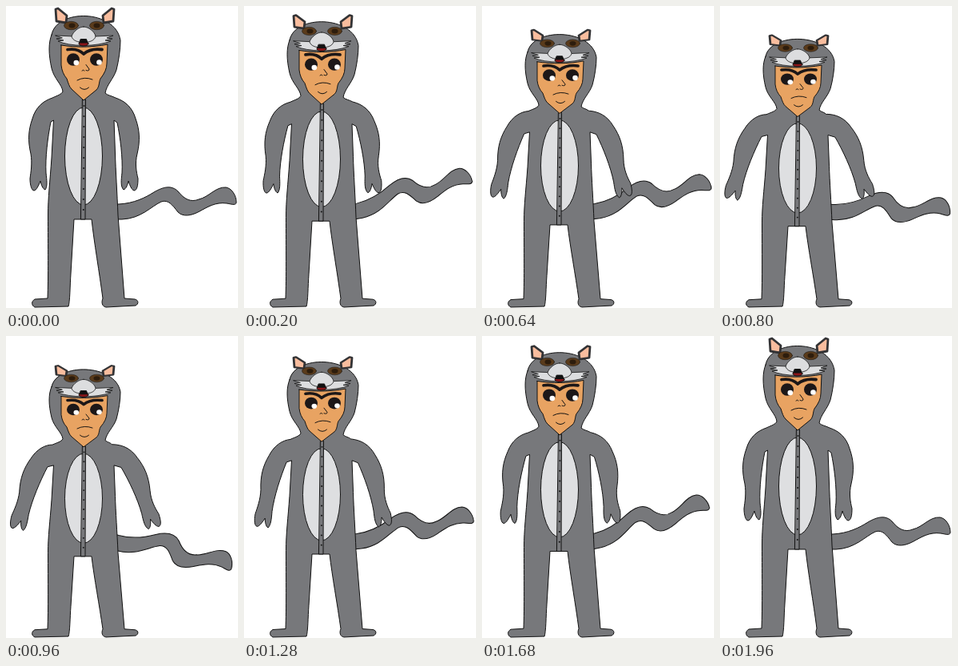
Animation of 290x378 px, one loop 2000 ms. Source, as an HTML page:

```html
<!DOCTYPE html>
<html lang="en">
<head>
<meta charset="utf-8">
<title>Rat costume</title>
<style>
  html, body { margin: 0; width: 100%; height: 100%; overflow: hidden; background: #fff; }
  svg { display: block; width: 100vw; height: 100vh; }
</style>
</head>
<body>
<svg viewBox="0 0 290 378" stroke="#111" stroke-width="1" stroke-linejoin="round" stroke-linecap="round">
  <path id="tail" fill="#77787b" d="M128,248 L141,248 C160,247 174,240 185,233 C197,226 207,224 215,232 C223,242 231,246 241,242 C254,239 262,226 275,227 C282,228 288,237 288,246 C287,250 282,248 276,247 C262,245 251,252 242,257 C231,263 221,264 215,258 C208,249 203,242 194,245 C181,251 169,266 145,267 L128,267"/>
  <path id="suit" fill="#77787b"/>
  <g id="front">
    <ellipse cx="97" cy="188" rx="23.5" ry="61" fill="#dedfe1"/>
    <path d="M95.8,117 L99.5,117 L99,267 L93.8,267Z" fill="#77787b"/>
    <path d="M97.5,125 L96.7,266" stroke-width="2" stroke-dasharray="0 13"/>

    <path d="M69,49 L69,74 Q70,84 76,91 C78,97 79,101 82,104 L97,118 L113,105 C117,101 116,95 118,91 Q126,81 126,72 L127,48 C107,52 88,52 69,49Z" fill="#e8a362"/>
    <path d="M77,54.5 C86,53 92,55 97,60 C103,55 110,53 120,54.5" fill="none" stroke="#1c1718" stroke-width="3.8"/>
    <g stroke="none">
      <ellipse cx="84" cy="67" rx="8" ry="7.8" fill="#1c1718"/>
      <ellipse cx="113" cy="67" rx="8" ry="7.8" fill="#1c1718"/>
      <circle cx="87.8" cy="71" r="3.3" fill="#fff"/>
      <circle cx="116.5" cy="70.5" r="3.3" fill="#fff"/>
    </g>
    <path d="M95,81 q1.5,-2 3,0 M100,73.5 L104,79 Q104,82 100,80.5 M89,93 Q98,88 108,92 M92.5,102 Q98,107 103.5,102" fill="none"/>

    <g id="ears" fill="#f9bd9e" stroke="#333335" stroke-width="2.8">
      <path d="M63,19 L62,4 L65,3 L76,12 L75,21Z"/>
      <path d="M134,19 L135,4 L132,3 L121,12 L122,21Z"/>
    </g>
    <g fill="#5a3b1b" stroke-width=".5">
      <ellipse cx="81.5" cy="24.5" rx="9" ry="5.2"/>
      <ellipse cx="113.5" cy="24.5" rx="9" ry="5.2"/>
    </g>
    <g fill="#2d1d0d" stroke="none">
      <ellipse cx="82.5" cy="24.5" rx="4" ry="3"/>
      <ellipse cx="113.5" cy="24.5" rx="4" ry="3"/>
    </g>
    <g fill="#dcdddf" stroke-width=".8">
      <path d="M62,37 L84,38 L112,38 L134,37 L126,40 L133,41 L124,43 L131,44 Q118,49 97,49.5 Q76,49 65,44 L72,43 L63,41 L70,40Z"/>
      <path d="M97,26 C103,26 111,32 112,38 C111,43 104,46 97,45 C90,46 83,43 82,38 C84,32 91,26 97,26Z"/>
    </g>
    <ellipse cx="97" cy="47" rx="6" ry="3" fill="#8b1518"/>
    <path d="M93.5,41.5 L100.5,41.5 L102,46 L92,46Z" fill="#111"/>
  </g>
</svg>
<script>
const $ = id => document.getElementById(id);
const FLOOR = 376, STEP = 40, LOOP = 2000;
const tailKeys = [[0, 0], [440, -22], [960, 17.5], [1485, -20], [1960, 0], [2000, 0]];
const crouchKeys = [[0, 0], [880, 1], [1960, 0], [2000, 0]];

// Outline pieces: which part moves the points, and the points themselves.
const outline = [
  ['body', 'M57,36 C53,46 53,60 57,78 C60,91 70,98 71,107 C69,111 64,112 58,115'],
  ['left', 'C46,119 37,127 33,141 C28,155 27,168 31,185 C33,197 31,208 30,216 C30,224 32,231 35,231 C38,231 41,224 43,219 C44,224 46,229 49,230 C52,226 51,218 50,209 C49,190 52,165 56,145'],
  ['body', 'L59.5,143 L57,190 C55,220 52.5,240 52.5,262 C52.5,300 53,340 52,366 L36,367 C31,370 32,375 36,377 L78,376 C80,370 80,350 81,335 L85,267 L107,267 C110,295 117,335 121,366 C119,371 120,376 125,377 L162,375 C166,373 166,368 161,367 L148,366 L140,262 C139,235 137,205 136.5,185 L135,143'],
  ['right', 'L139,146 C143,165 146,190 145,209 C144,218 143,226 147,230 C150,229 152,224 153,219 C155,225 157,230 160,231 C164,231 165,224 165,216 C163,208 161,197 164,185 C168,168 167,155 162,141 C158,127 149,119 137,115'],
  ['body', 'C131,112 127,112 124,109 C126,98 134,92 138,80 C141,68 143,54 143,43 C137,4 63,3 57,36Z']
];

function track(keys, t) {
  const i = keys.findIndex(k => k[0] > t);
  const [t0, a] = keys[i - 1], [t1, b] = keys[i];
  return a + (b - a) * (t - t0) / (t1 - t0);
}

const warp = (d, move) => d.replace(/([\d.]+),([\d.]+)/g,
  (_, x, y) => move(+x, +y).map(v => v.toFixed(2)).join());

function draw(t) {
  const crouch = track(crouchKeys, t);
  const scale = 1 - 0.0875 * crouch;
  const sink = y => FLOOR + (y - FLOOR) * scale;
  const arm = (px, degrees) => {
    const py = 130, a = degrees * Math.PI / 180, c = Math.cos(a), s = Math.sin(a);
    return (x, y) => [px + (x - px) * c - (y - py) * s, sink(py) + (x - px) * s + (y - py) * c];
  };
  const moves = {
    body: (x, y) => [x, sink(y)],
    left: arm(58, 17.5 * crouch),
    right: arm(137, -20 * crouch)
  };
  $('suit').setAttribute('d', outline.map(([part, d]) => warp(d, moves[part])).join(' '));
  $('front').setAttribute('transform', `translate(0 ${FLOOR * (1 - scale)}) scale(1 ${scale})`);
  const earScale = 1 - 0.24 * crouch;
  $('ears').setAttribute('transform', `translate(0 ${22 * (1 - earScale)}) scale(1 ${earScale})`);
  $('tail').setAttribute('transform', `rotate(${track(tailKeys, t)} 136 248)`);
}

const start = performance.now();
function tick() {
  const t = (performance.now() - start) % LOOP;
  draw(Math.floor(t / STEP) * STEP);
  requestAnimationFrame(tick);
}
draw(0);
requestAnimationFrame(tick);
</script>
</body>
</html>
```
